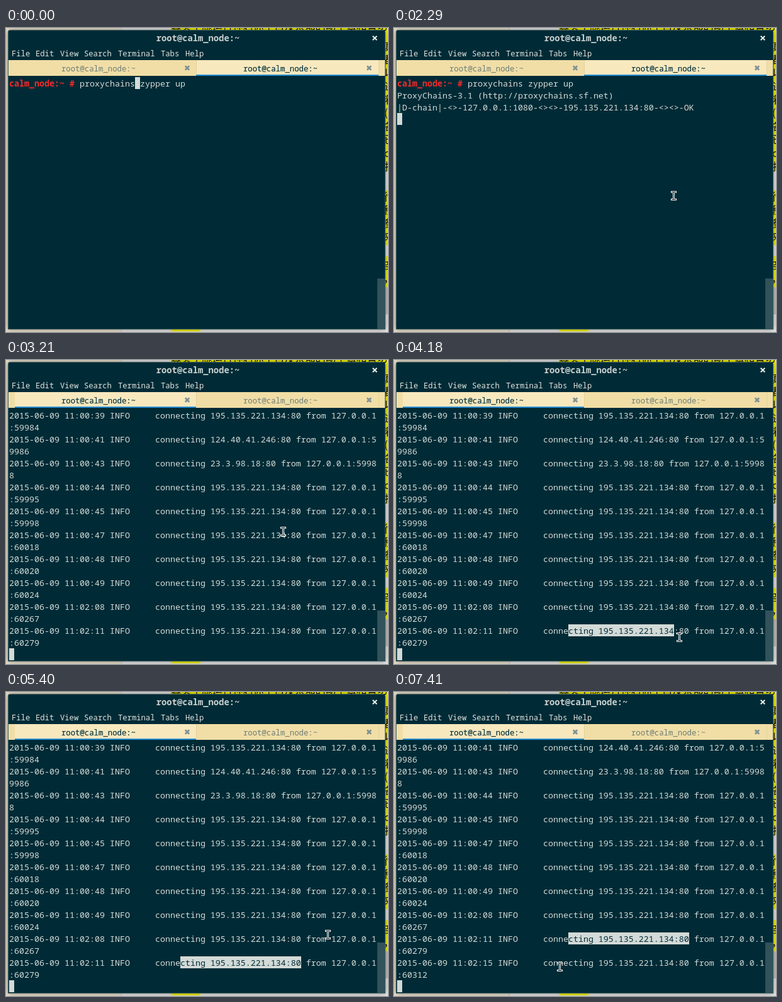
Write an HTML page with a canvas that moves like this. It is 607 px wide and 483 px high and loops after 8 s.

```html
<!DOCTYPE html>
<html lang="en">
<head>
<meta charset="utf-8">
<title>Terminal session</title>
<style>
html, body { margin: 0; width: 100%; height: 100%; overflow: hidden; background: #ece4d0; }
canvas { display: block; }
</style>
</head>
<body>
<canvas id="stage" width="607" height="483"></canvas>
<script>
const ctx = document.getElementById('stage').getContext('2d');
const LOOP = 8000;
const MONO = '"Noto Sans Mono", "DejaVu Sans Mono", monospace';
const CJK = '"Noto Sans CJK SC", "Noto Sans CJK", sans-serif';
const DARK = '#002b36', LIGHT = '#d3dad7', YELLOW = '#f8f800';
const HOST = 'calm_node', TITLE = `root@${HOST}:~`;

// Terminal grid
const LEFT = 5, TOP = 78, CELL = 8, ROW = 19, COLS = 73;
const TERM_FONT = `13.3333px ${MONO}`;

// Moments at which the picture switches
const ENTER = 500, REPLY = 810, POINTER = 2290, SWITCH = 2330, SWITCHED = 2550;
const LINE_A = 3130, PRESS = 3940, RELEASE = 4400, LINE_B = 7410;

const MAIN = '195.135.221.134';
const LOG = [
  ['11:00:38', MAIN, 59981],
  ['11:00:39', MAIN, 59984],
  ['11:00:41', '124.40.41.246', 59986],
  ['11:00:43', '23.3.98.18', 59988],
  ['11:00:44', MAIN, 59995],
  ['11:00:45', MAIN, 59998],
  ['11:00:47', MAIN, 60018],
  ['11:00:48', MAIN, 60020],
  ['11:00:49', MAIN, 60024],
  ['11:02:08', MAIN, 60267],
  ['11:02:11', MAIN, 60279],
  ['11:02:15', MAIN, 60312]
].flatMap(([time, ip, port]) => {
  const line = `2015-06-09 ${time} INFO     connecting ${ip}:80 from 127.0.0.1:${port}`;
  return [line.slice(0, COLS), line.slice(COLS)];
});

// Pointer path: time, x, y
const PATH = [
  [2290, 444, 266], [2550, 440, 271], [3130, 440, 271], [3210, 440, 272],
  [3890, 278, 430], [3940, 278, 430], [4180, 453, 440], [4240, 468, 443],
  [4340, 472, 436], [4400, 472, 436], [4610, 505, 447], [4730, 510, 433],
  [5170, 510, 384], [5360, 510, 384], [5400, 511, 385], [5750, 510, 384],
  [5960, 510, 385], [6160, 510, 384], [6400, 430, 405], [6920, 263, 436]
];

function pointerAt(t) {
  const i = PATH.findIndex(p => p[0] > t);
  if (i < 0) return PATH[PATH.length - 1].slice(1);
  if (i === 0) return PATH[0].slice(1);
  const [t0, x0, y0] = PATH[i - 1], [t1, x1, y1] = PATH[i];
  const k = (t - t0) / (t1 - t0);
  return [x0 + (x1 - x0) * k, y0 + (y1 - y0) * k];
}

function box(color, x, y, w, h) {
  ctx.fillStyle = color;
  ctx.fillRect(x, y, w, h);
}

function text(str, x, y, color, font, align = 'left') {
  ctx.font = font;
  ctx.fillStyle = color;
  ctx.textAlign = align;
  ctx.fillText(str, x, y);
}

function cross(x, y, r, width, color) {
  ctx.strokeStyle = color;
  ctx.lineWidth = width;
  ctx.beginPath();
  ctx.moveTo(x - r, y - r);
  ctx.lineTo(x + r, y + r);
  ctx.moveTo(x + r, y - r);
  ctx.lineTo(x - r, y + r);
  ctx.stroke();
}

function cells(str, col, row, color = LIGHT, bold = '') {
  text(str, LEFT + col * CELL, TOP + row * ROW + 15, color, bold + TERM_FONT);
}

function caret(col, row) {
  box(LIGHT, LEFT + col * CELL, TOP + row * ROW, CELL, ROW);
}

function drawDesktop() {
  box('#ece4d0', 0, 0, 183, 483);
  box('#e9e9e9', 183, 0, 424, 483);
  box('#c9c9c5', 183, 0, 1, 483);
  box(YELLOW, 262, 0, 345, 10);
  text('真实手腕运行神若你手自没茶都的动手做和置切', 262, 3, '#111', `16.4px ${CJK}`);
  [[10, 218], [258, 87], [362, 50]].forEach(([y, h]) => box(YELLOW, 600, y, 7, h));
  box('#c4c4c4', 603, 412, 4, 43);
  box(YELLOW, 262, 479, 47, 3);
  [...'真都以进着(各已c打'].forEach((ch, i) =>
    text(ch, 601, 35 + i * 21.2, '#111', `16.4px ${CJK}`));
  [...'行移参来'].forEach((ch, i) =>
    text(ch, 600, 274 + i * 21.2, '#111', `16.4px ${CJK}`));
  text('g', 600, 380, '#111', `16.4px ${CJK}`);
  text('，', 600, 404, '#111', `16.4px ${CJK}`);
}

function drawFrame() {
  ctx.save();
  ctx.shadowColor = 'rgba(0,0,0,0.5)';
  ctx.shadowBlur = 8;
  ctx.fillStyle = '#43605f';
  ctx.beginPath();
  ctx.roundRect(3, 3, 600, 476, [4, 4, 0, 0]);
  ctx.fill();
  ctx.restore();
  box(DARK, 4, 4, 598, 474);
  text(TITLE, 305, 21, '#c9d1d0', `bold 13.8px ${MONO}`, 'center');
  cross(586, 16, 3.3, 2, '#e8ecea');
  const menu = { File: 9, Edit: 47, View: 86, Search: 124, Terminal: 178, Tabs: 246, Help: 285 };
  for (const name in menu) text(name, menu[name], 45, '#dfe4e0', `12.2px ${MONO}`);
}

function drawTab(x, w, center, active) {
  ctx.globalAlpha = active;
  box('#f8e8bd', x, 51, w, 25);
  box('#268bd2', x, 74, w, 2);
  ctx.globalAlpha = 1;
  const font = `12.3px ${MONO}`;
  text(TITLE, center, 69, '#6b7d76', font, 'center');
  ctx.globalAlpha = active;
  text(TITLE, center, 69, '#073642', font, 'center');
  ctx.globalAlpha = 1;
  cross(center + 141, 63.5, 3.2, 2.8, '#7f9394');
}

function drawTabs(t) {
  const k = Math.min(1, Math.max(0, (t - SWITCH) / (SWITCHED - SWITCH)));
  box('#f1dea6', 4, 51, 598, 25);
  drawTab(14, 288, 147, k);
  drawTab(302, 290, 436, 1 - k);
  box('#e3d29c', 302, 51, 1, 23);
  box('#e3d29c', 592, 51, 1, 25);
}

function drawShell(t) {
  cells(`${HOST}:~ #`, 0, 0, '#f52a2a', 'bold ');
  cells('proxychains zypper up', 14, 0);
  if (t < ENTER) return caret(25, 0);
  cells('ProxyChains-3.1 (http://proxychains.sf.net)', 0, 1);
  if (t < REPLY) return caret(0, 2);
  cells('|D-chain|-<>-127.0.0.1:1080-<><>-195.135.221.134:80-<><>-OK', 0, 2);
  caret(0, 3);
}

function select(line, row, from, to) {
  if (to <= from) return;
  const x = LEFT + from * CELL, y = TOP + row * ROW, w = (to - from) * CELL;
  ctx.save();
  ctx.beginPath();
  ctx.rect(x, y, w, ROW);
  ctx.clip();
  box(LIGHT, x, y, w, ROW);
  cells(line, 0, row, DARK);
  ctx.restore();
}

function drawLog(t) {
  const first = t < LINE_A ? 0 : t < LINE_B ? 2 : 4;
  const rows = LOG.slice(first, first + 20);
  rows.forEach((line, i) => cells(line, 0, i));
  caret(0, 20);
  if (t < PRESS) return;
  const start = 34, row = 20 - first;
  // The highlight trails the pointer slightly
  const [x, y] = pointerAt(Math.min(t, RELEASE) - 10);
  const col = Math.floor((x - LEFT) / CELL);
  const below = y >= 440;
  select(rows[row], row, start, below ? COLS : col);
  if (below) select(rows[row + 1], row + 1, 0, col);
}

function drawPointer(t) {
  const [px, py] = pointerAt(t).map(Math.round);
  const parts = [[-3, -6, 3, 1], [1, -6, 3, 1], [0, -6, 1, 13], [-3, 6, 3, 1], [1, 6, 3, 1]];
  parts.forEach(([x, y, w, h]) => box('#fff', px + x - 1, py + y - 1, w + 2, h + 2));
  parts.forEach(([x, y, w, h]) => box('#101010', px + x, py + y, w, h));
}

function draw(t) {
  drawDesktop();
  drawFrame();
  drawTabs(t);
  (t < SWITCH ? drawShell : drawLog)(t);
  box('#32525c', 590, 398, 12, 80);
  if (t >= POINTER) drawPointer(t);
}

function tick() {
  draw(performance.now() % LOOP);
  requestAnimationFrame(tick);
}
tick();
</script>
</body>
</html>
```
